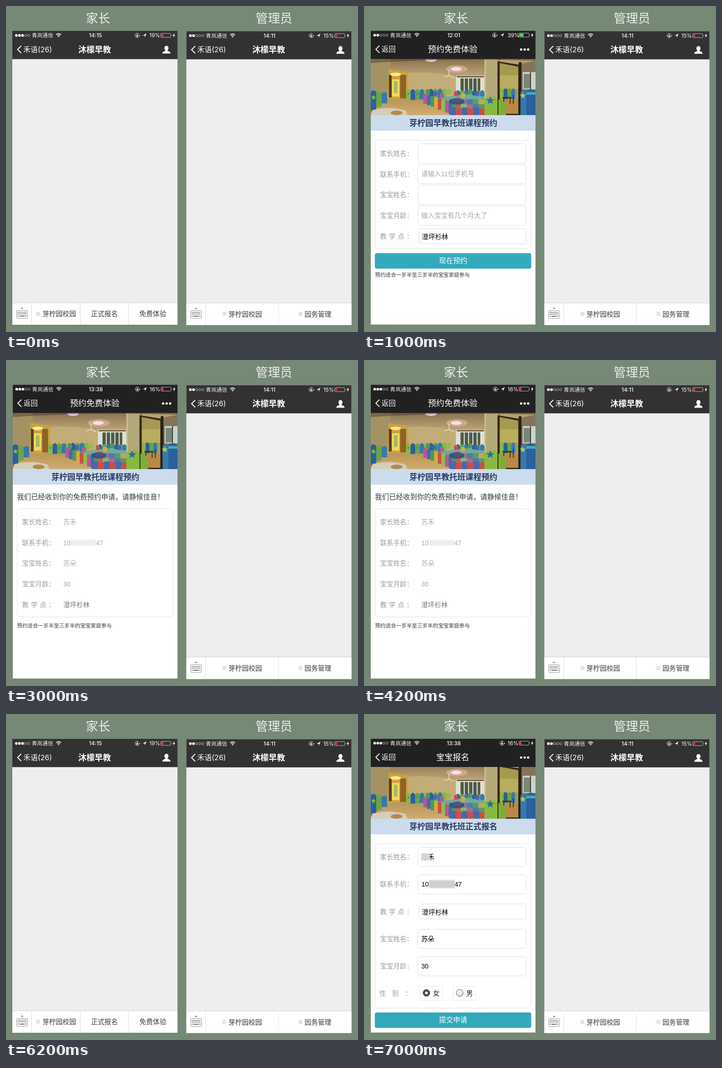
An HTML page that plays this animation: 778x720 px, repeating every 8000 ms.

```html
<!DOCTYPE html>
<html lang="zh-CN">
<head>
<meta charset="utf-8">
<title>预约演示</title>
<style>
html, body { margin: 0; width: 100%; height: 100%; overflow: hidden; background: #768876; }
svg { display: block; width: 778px; height: 720px; }
text { white-space: pre; font-family: 'Liberation Sans', 'Noto Sans CJK SC', 'Noto Sans CJK', sans-serif; }
.ui { font-family: Inter, 'Noto Sans CJK SC', 'Noto Sans CJK', sans-serif; }
</style>
</head>
<body>
<svg id="stage" viewBox="0 0 778 720" xmlns="http://www.w3.org/2000/svg"></svg>
<script>
const LOOP = 8000;
const CARRIER = '青岚通信', APP = '禾语', SCHOOL = '沐檬早教', CAMPUS = '芽柠园', PLACE = '澄坪杉林';
const PARENT = '苏禾', CHILD = '苏朵';
const GREY = '#9a9a9a', INK = '#2d3a42', TEAL = '#33a9bc';

const rect = (x, y, w, h, fill, more = '') =>
  `<rect x="${x}" y="${y}" width="${w}" height="${h}" fill="${fill}" ${more}/>`;
const path = (d, fill, more = '') => `<path d="${d}" fill="${fill}" ${more}/>`;
const line = (d, stroke, w = 1) => path(d, 'none', `stroke="${stroke}" stroke-width="${w}"`);
const circle = (x, y, r, fill, more = '') => `<circle cx="${x}" cy="${y}" r="${r}" fill="${fill}" ${more}/>`;
const oval = (x, y, rx, ry, fill, more = '') =>
  `<ellipse cx="${x}" cy="${y}" rx="${rx}" ry="${ry}" fill="${fill}" ${more}/>`;
const text = (x, y, s, size, fill, more = '') =>
  `<text x="${x}" y="${y}" font-size="${size}" fill="${fill}" ${more}>${s}</text>`;
const mid = (x, y, s, size, fill, more = '') => text(x, y, s, size, fill, 'text-anchor="middle" ' + more);
const group = (s, x = 0, y = 0, more = '') => `<g transform="translate(${x} ${y})" ${more}>${s}</g>`;
const times = (n, fn) => Array.from({ length: n }, (_, i) => fn(i)).join('');

// Status bar, drawn for a phone whose left edge is x = 14
function status({ bars, time, charge, lock = 290, arrow = 306 }) {
  const low = charge < 20;
  return times(5, i => circle(23 + i * 6.8, 65, i < bars ? 2.9 : 2.5, i < bars ? '#fff' : 'none',
      i < bars ? '' : 'stroke="#ddd" stroke-width=".8"'))
    + text(57, 69.4, CARRIER, 11.8, '#f4f4f4', 'class="ui"')
    + line('M110.8 63.2Q116.3 58.6 121.8 63.2M112.9 65.4Q116.3 62.6 119.7 65.4', '#fff', 1.5)
    + path('M114.4 66.7Q116.3 65.3 118.2 66.7L116.3 69Z', '#fff')
    + mid(197.8, 69.3, time, 11.9, '#fff', 'class="ui" font-weight="500"')
    + line(`M${lock + 3.6} 61.9A4.7 4.7 0 1 0 ${lock + 4.2} 67.2`, '#eee', 1)
    + line(`M${lock - 1.3} 65V63.8A1.3 1.3 0 0 1 ${lock + 1.3} 63.8V65`, '#eee', .9)
    + rect(lock - 2, 64.7, 4, 2.9, '#eee')
    + path(`M${lock + 3} 64.4h4l-2 2.4Z`, '#eee')
    + (arrow ? path(`M${arrow + 4.5} 60.6L${arrow + .7} 69.6V65.3H${arrow - 4}Z`, '#fff') : '')
    + text(316.8, 69.3, charge + '%', 11.9, '#fff', 'class="ui"')
    + rect(342, 60.5, 22.2, 8.8, 'none', 'rx="1.6" stroke="#ccc" stroke-width=".9"')
    + rect(343.2, 61.7, charge * .2 + 1, 6.4, low ? '#e8323a' : '#4cd662', 'rx=".6"')
    + path('M365.3 63.2Q367 64.9 365.3 66.6Z', '#ccc')
    + path('M372.4 60L368.3 65.6H370.8L369.6 70L373.9 64.1H371.4Z', '#fff');
}

const back = (label, size) =>
  line('M33.6 88L25.6 96L33.6 104', '#fff', 2) + text(38.2, 101.8, label, size, '#fff', 'class="ui"');

const person = oval(354.6, 93, 4.5, 5.3, '#fff')
  + path('M352 96H357.2V99Q363.6 100.4 363.8 105H345.4Q345.6 100.4 352 99Z', '#fff');

const keyboard = path('M32.8 668.6L35.5 665.6L38.2 668.6Z', '#666')
  + rect(23.5, 672.3, 24, 17.4, '#fff', 'rx="2" stroke="#8c8c8c"')
  + times(12, i => rect(26 + i % 6 * 3.3, 675.4 + (i / 6 | 0) * 3.6, 2, 2, '#666'))
  + rect(26, 683.4, 2, 2, '#666') + rect(29.6, 683.8, 12, 2, '#666') + rect(43, 683.4, 2, 2, '#666');

const lines = x => times(3, i => rect(x, 676 + i * 3, 8, 1, '#b0b0b0'));
const tab = (x, s) => text(x, 685, s, 14.8, '#3c3c3c', 'class="ui"');

function chat(bar, tabs) {
  return rect(14, 55, 365, 649, '#eeeeee') + rect(14, 55, 365, 62.3, '#333233')
    + status(bar) + back(APP + '(26)', 16)
    + mid(196, 102.5, SCHOOL, 18.1, '#fff', 'class="ui" font-weight="600"') + person
    + rect(14, 655, 365, 49, '#fff') + rect(14, 655, 365, 1, '#cfcfcf')
    + rect(56, 656, 1, 48, '#dcdcdc') + keyboard + tabs;
}

function star(x, y, r, fill) {
  const pts = Array.from({ length: 10 }, (_, i) => {
    const a = i * Math.PI / 5 - Math.PI / 2, q = i % 2 ? r * .45 : r;
    return (x + q * Math.cos(a)).toFixed(1) + ' ' + (y + q * Math.sin(a)).toFixed(1);
  });
  return path('M' + pts.join('L') + 'Z', fill);
}

// Simplified playroom picture, 117..241
function room() {
  const green = '#88b93f', blue = '#2b5f9e', pads = [green, blue, '#6aa545', '#3679ae'];
  const toys = ['#c8504a', '#d9a93c', '#4a9a58', '#4a68a8', '#b45a96', '#8fbf48'];
  const pad = (x, y, w, h, i) => path(`M${x} ${y + h}V${y + 4}Q${x + w / 2} ${y - 4} ${x + w} ${y + 4}V${y + h}Z`, pads[i % 4]);
  return rect(15, 117, 364, 125, '#b9a06c')
    + path('M55 117H300V152L205 155Q150 146 96 148L55 140Z', 'url(#ceil)')
    + path('M15 117H60L50 210L15 216Z', '#a39364')
    + path('M54 139L98 146V206H54Z', '#cda13f') + rect(55, 152, 6, 50, '#5a3d1f')
    + rect(62, 162, 16, 38, '#f0d95e') + rect(66, 166, 8, 26, '#a8b960') + rect(80, 152, 13, 52, '#8f6224')
    + oval(70, 151, 12, 4, '#ffe980')
    + path('M98 148Q150 144 204 156V200H98Z', '#c2ad78')
    + path('M40 208Q140 198 270 206V242H24Z', 'url(#floor)')
    + path('M52 203L15 235V217Z', '#8c7444')
    + oval(148, 119, 13, 4, '#f7d5e8') + oval(205, 139, 24, 8, '#d9b694', 'opacity=".7"') + oval(204, 139, 12, 4.2, '#fbdcf2')
    + line('M188 140V154M178 157L188 153L199 159', '#eee4d0', 1.5)
    + rect(203, 154, 63, 46, '#e0dfd0') + rect(211, 160, 46, 30, '#4f5b48')
    + times(5, i => rect(211 + i * 9.5, 158, 2.2, 34, '#dfe4d8')) + rect(205, 155, 60, 2.5, '#5d4a33')
    + times(9, i => pad(93 + i * 10, 184 - i * .2, 10, 24 - i * .4, i))
    + times(4, i => star(98 + i * 20, 194, 3, '#3b78b8'))
    + times(7, i => pad(203 + i * 9, 186, 9, 15, i + 1))
    + path('M150 205L222 195L266 200V242H205Z', '#6fa8a2')
    + times(18, i => rect(188 + i % 6 * 13, 206 + (i / 6 | 0) * 11, 13, 11, toys[(i * 5 + (i / 6 | 0)) % 6], 'opacity=".75"'))
    + times(9, i => rect(131 + i * 8, 194 + i * 2.5, 8, 22 + i * .8, toys[(i * 5 + 4) % 6], 'rx="2"'))
    + times(8, i => rect(137 + i * 15.5, 184 + i % 3 * 4, 9, 11, toys[(i + 2) % 6], 'rx="3"'))
    + oval(205, 211, 17, 7, '#31597c') + oval(206, 208, 9, 5, '#6a4b72')
    + times(6, i => rect(190 + i * 13, 224 + i % 2 * 2, 13, 17, toys[(i * 3 + 3) % 6], 'rx="2"'))
    + rect(266, 117, 31, 125, '#b3a878') + rect(266, 117, 4, 90, '#c6ba8b')
    + pad(266, 200, 31, 42, 0) + star(279, 209, 9, '#2b68b0')
    + path('M295 122L345 130V242H295Z', '#392a1d') + path('M300 126L341 134V238H300Z', '#a59a50')
    + rect(300, 153, 41, 30, '#b9ad60')
    + times(4, i => pad(300 + i * 8.5, 182, 8.5, 24, i)) + path('M300 207H341V238H300Z', '#b88946')
    + rect(306, 201, 20, 3, '#42321f') + line('M309 203V217M323 203V216M330 196V216', '#42321f', 2)
    + path('M297 206L314 214V242H297Z', '#7cad3c')
    + rect(342, 124, 6, 118, '#2c2119') + path('M348 127L379 121V242H348Z', '#85745a')
    + rect(351, 146, 28, 38, '#c9d3cd') + rect(353, 150, 15, 32, '#758879') + rect(367, 146, 2, 40, '#443426')
    + pad(346, 186, 14, 56, 3) + pad(359, 184, 20, 58, 1) + star(351, 198, 7, '#b5cc4d')
    + rect(359, 190, 20, 6, '#49a8bd')
    + times(3, i => pad(15 + i * 12, 186 + i * 2, 12, 43 - i * 9, i + 1)) + star(21, 202, 6, '#86b746')
    + path('M19 230Q55 220 92 231L96 242H15Z', '#d3cdbb') + oval(72, 236, 13, 5, '#b38a4c')
    + path('M15 117H379V121Q197 114 15 126Z', '#4c3d27', 'opacity=".5"');
}

// Page with picture and caption strip; cut = rows trimmed off the picture's top
function page(bar, title, caption, cut, body) {
  return rect(15, 54.5, 364, 649, '#fff') + rect(15, 54.5, 364, 62.5, '#222122')
    + group(status(bar) + back('返回', 15.6), .6, -.6)
    + mid(196, 102, title, 18.3, '#fff', 'class="ui" font-weight="500"')
    + times(3, i => circle(347.3 + i * 7.8, 96, 2.6, '#fff'))
    + `<g clip-path="url(#pic)">${group(room(), 0, -cut)}</g>`
    + rect(15, 241 - cut, 364, 34.3, '#cddcec')
    + mid(197.5, 264.6 - cut, CAMPUS + caption, 17.7, '#2a3a63', 'font-weight="900"')
    + body;
}

const frame = (y, h) => rect(24.5, y, 344.8, h, '#fff', 'rx="8" stroke="#e2e2e2"');
const field = (y, h = 42.5, x = 119) => rect(x, y, 358.5 - x, h, '#fff', 'rx="5.5" stroke="#dedede"');
const label = (y, s) => text(35.5, y, s + '：', 14.6, GREY);
const wide = (y, s) => text(35.5, y, s + '：', 14.6, GREY, 'letter-spacing="4.9"');
const value = (y, s, fill = '#000', x = 126.5) => text(x, y, s, 14.6, fill);
const button = (y, s) => rect(24, y, 345.6, 34, TEAL, 'rx="4"') + mid(197, y + 21.7, s, 15.6, '#fff');
const note = y => text(24.3, y, '预约适合一岁半至三岁半的宝宝家庭参与', 11.65, INK);
const labels = y => ['家长姓名', '联系手机', '宝宝姓名', '宝宝月龄'].map((s, i) => label(y + i * 45.8, s)).join('')
  + wide(y + 183.2, '教学点');

const booking = frame(296.3, 239) + labels(330.8)
  + times(4, i => field(304.5 + i * 45.8)) + field(491.5, 33.5, 121.5)
  + value(376.4, '请输入11位手机号', '#a6a6a6') + value(468, '输入宝宝有几个月大了', '#a6a6a6')
  + value(514.6, PLACE, '#000', 127.8) + button(546, '现在预约') + note(598);

const receipt = text(24.3, 307.7, '我们已经收到你的免费预约申请，请静候佳音！', 15.5, INK)
  + frame(328.5, 239) + labels(362.8)
  + value(362.8, PARENT, '#b0b0aa') + value(408.6, '10', '#aaa') + rect(143, 397, 56, 13, '#eeeeee')
  + value(408.6, '47', '#aaa', 199) + value(454.4, CHILD, '#b0b0aa') + value(500.2, '30', '#aaa')
  + value(546, PLACE, '#777') + note(591);

const radio = (x, s, on) => rect(x - 14.5, 601.5, 49.5, 31, '#fff', 'stroke="#d8d8d8" stroke-dasharray="1.5 1"')
  + circle(x, 616, 7.6, on ? '#4a4a4a' : 'url(#knob)', 'stroke="#4d4d4d"')
  + (on ? circle(x, 616, 3.1, '#f2f2f2') : '') + text(x + 14.5, 621.8, s, 14.6, '#222');

const signup = frame(286.5, 363) + label(320.8, '家长姓名') + label(381.2, '联系手机') + wide(441.5, '教学点')
  + label(502, '宝宝姓名') + label(562.4, '宝宝月龄')
  + text(34, 622.4, '性', 14.4, GREY) + text(62.3, 622.4, '别', 14.4, GREY) + text(91, 622.4, '：', 14.4, GREY)
  + [294.5, 355, 475.5, 536].map(y => field(y)).join('') + field(419.5, 33.5, 121.5)
  + value(320.8, PARENT) + rect(126, 308, 19, 15, '#d6d6d6', 'filter="url(#soft)"')
  + value(381.2, '10', '#000', 127) + value(381.2, '47', '#000', 200)
  + rect(143.5, 367, 57.5, 17.5, '#cfcfcf', 'filter="url(#soft)"')
  + value(442.7, PLACE, '#000', 127.8) + value(502, CHILD) + value(562.4, '30')
  + radio(138, '女', true) + radio(211.5, '男', false) + button(659.3, '提交申请');

const scenes = {
  home: chat({ bars: 3, time: '14:15', charge: 19 },
    rect(163.5, 656, 1, 48, '#dcdcdc') + rect(270.5, 656, 1, 48, '#dcdcdc')
    + lines(67) + tab(80.7, CAMPUS + '校园') + tab(188, '正式报名') + tab(295, '免费体验')),
  booking: page({ bars: 2, time: '12:01', charge: 39, lock: 288, arrow: 304.5 },
    '预约免费体验', '早教托班课程预约', 0, booking),
  receipt: page({ bars: 3, time: '13:38', charge: 16 },
    '预约免费体验', '早教托班课程预约', 0, receipt),
  signup: page({ bars: 3, time: '13:38', charge: 16, lock: 304.5, arrow: 0 },
    '宝宝报名', '早教托班正式报名', 9.7, signup)
};

const admin = chat({ bars: 2, time: '14:11', charge: 15 },
  rect(217, 656, 1, 48, '#dcdcdc') + lines(94) + tab(107.2, CAMPUS + '校园')
  + lines(262) + tab(275.2, '园务管理'));

const ramp = (id, a, b) => `<linearGradient id="${id}" x1="0" y1="0" x2="0" y2="1">
  <stop stop-color="${a}"/><stop offset="1" stop-color="${b}"/></linearGradient>`;

document.getElementById('stage').innerHTML = `<defs>
  ${ramp('ceil', '#8b7450', '#bda478')}${ramp('floor', '#b8935a', '#d0ad70')}${ramp('knob', '#fff', '#ddd')}
  <clipPath id="pic">${rect(15, 117, 364, 125, '#000')}</clipPath>
  <filter id="soft"><feGaussianBlur stdDeviation="1.2"/></filter></defs>`
  + rect(0, 0, 778, 720, '#768876')
  + text(176.5, 37.2, '家长', 27, '#eceeec') + text(551.7, 37.2, '管理员', 27, '#eceeec')
  + group(admin, 384.6, .5)
  + Object.entries(scenes).map(([id, s]) => `<g id="${id}">${s}</g>`).join('');

const plan = [[0, 'home'], [1000, 'booking'], [3000, 'receipt'], [5000, 'home'], [7000, 'signup']];
const layers = Object.keys(scenes).map(id => document.getElementById(id));

function draw(t) {
  const now = plan.filter(([start]) => start <= t).pop()[1];
  for (const g of layers) g.style.display = g.id === now ? '' : 'none';
}

const begin = performance.now();
function tick() {
  draw((performance.now() - begin) % LOOP);
  requestAnimationFrame(tick);
}
tick();
</script>
</body>
</html>
```
